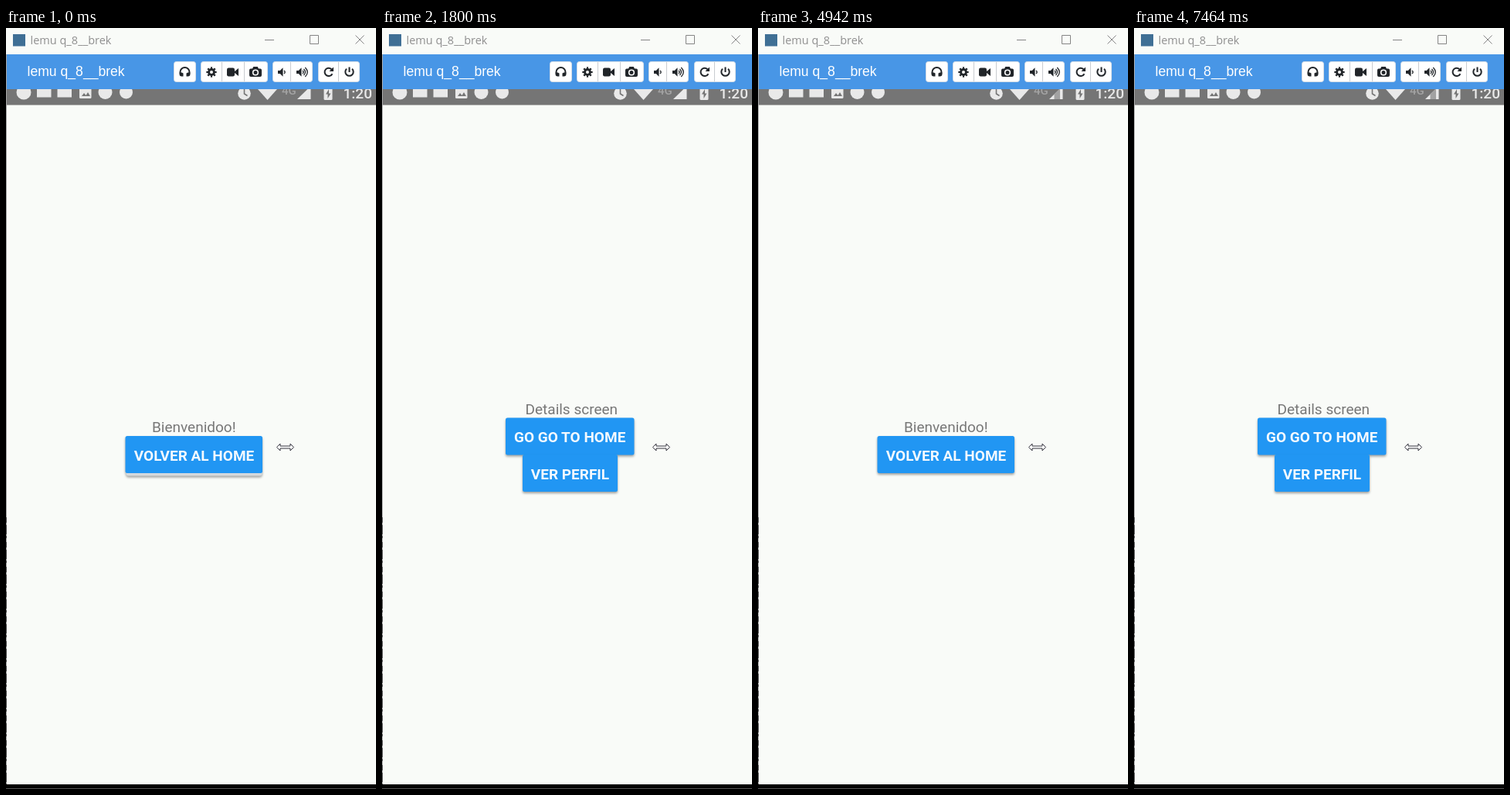
An HTML page that plays this animation: 479 by 983 pixels, repeating every 8000 ms.

```html
<!DOCTYPE html>
<html lang="es">
<head>
<meta charset="utf-8">
<title>Screen mirror</title>
<style>
  html, body { margin: 0; width: 100%; height: 100%; overflow: hidden; background: #f9fbf8; }
  svg { display: block; width: 479px; height: 983px; }

  .title { font: 14.5px "Open Sans", "Noto Sans", sans-serif; fill: #8f8f8f; }
  .device { font: 17.6px "Liberation Sans", Arial, sans-serif; fill: #fff; }
  .window { fill: none; stroke: #858585; }
  .group { fill: #fff; stroke: #d3dce6; }
  .divider { stroke: #c9ccd0; }
  .icon { fill: #212529; }
  .line { fill: none; stroke: #212529; stroke-width: 2; }

  .status { fill: #e9e9e9; filter: blur(.45px); }
  .status text { font: 500 19px Roboto, sans-serif; }
  .status .net { font-size: 15px; fill: #a3a3a3; }
  .cut { fill: none; stroke: #757575; stroke-width: 1.6; }

  .screen { font: 19px Roboto, sans-serif; text-anchor: middle; visibility: hidden; }
  .label { fill: #777; filter: blur(.35px); }
  .button rect { fill: #2196f3; }
  .button { filter: drop-shadow(0 2px 1.6px rgba(0, 0, 0, .36)); }
  .button text { font-weight: 700; fill: #f4f9fe; filter: blur(.3px); }

  .screen, #weak, #lift { animation: 8s step-end infinite; }
  #welcome { animation-name: welcome; }
  #home { animation-name: home; }
  #details { animation-name: details; }
  #weak { visibility: hidden; animation-name: weak; }
  #lift { visibility: hidden; animation-name: lift; }

  @keyframes welcome {
    0%, 42.125% { visibility: visible; }
    1.5%, 74.875%, 100% { visibility: hidden; }
  }
  @keyframes home {
    0%, 22.5%, 83.25%, 100% { visibility: hidden; }
    1.5%, 74.875% { visibility: visible; }
  }
  @keyframes details {
    0%, 42.125% { visibility: hidden; }
    22.5%, 83.25%, 100% { visibility: visible; }
  }
  @keyframes weak {
    0% { visibility: hidden; }
    34.875%, 100% { visibility: visible; }
  }
  @keyframes lift {
    0% { visibility: visible; }
    1.5%, 100% { visibility: hidden; }
  }
</style>
</head>
<body>
<svg viewBox="0 0 479 983">
  <rect width="479" height="983" fill="#f9fbf8"/>

  <!-- Phone status bar, partly under the toolbar -->
  <rect x="1" y="78" width="478" height="21.5" fill="#757575"/>
  <g class="status">
    <circle cx="23" cy="83" r="9.5"/>
    <rect x="40" y="74" width="18.5" height="15.5"/>
    <rect x="66.500" y="74" width="18.500" height="15.500"/>
    <rect x="95" y="76" width="15.500" height="15" rx="1.500"/>
    <path class="cut" d="M98 88l3-4 2.500 3 2.500-4 3 5z" style="fill:#757575;stroke:none"/>
    <circle cx="128.500" cy="83" r="9"/>
    <circle cx="155.500" cy="83" r="8.500"/>
    <circle cx="308.500" cy="84.500" r="8.300"/>
    <path class="cut" d="M308.500 79v6l4 2.500"/>
    <path d="M326 79q12.500-7 25 0L338.500 93z"/>
    <text class="net" x="357" y="86">4G</text>
    <path d="M377 92L394.500 75v17z"/>
    <path id="weak" d="M383.500 92v-6.300L391 78.400V92z" fill="#a2a2a2"/>
    <rect x="411.500" y="76" width="11" height="17" rx="1.500"/>
    <path d="M418 79l-4 6.500h2.500V91l4-6.500h-2.500z" fill="#757575"/>
    <text x="436.500" y="91">1:20</text>
  </g>

  <!-- Window title -->
  <rect x="9" y="8" width="16" height="15.500" fill="#3f6f95"/>
  <text class="title" x="31.500" y="21">lemu q_8__brek</text>
  <path class="window" d="M335 15.500h12M393.500 9.500h11v11h-11zM452.500 9.500l11 11m0-11l-11 11"/>

  <!-- Toolbar -->
  <rect x="1" y="34" width="478" height="45" fill="#4896e6"/>
  <text class="device" x="27.500" y="62">lemu q_8__brek</text>
  <g class="group">
    <rect x="217.500" y="43.500" width="28" height="26" rx="3"/>
    <rect x="252.500" y="43.500" width="86" height="26" rx="3"/>
    <rect x="345.500" y="43.500" width="51" height="26" rx="3"/>
    <rect x="404.500" y="43.500" width="53" height="26" rx="3"/>
  </g>
  <path class="divider" d="M279.500 44v25M308.500 44v25M368.500 44v25M430.500 44v25"/>

  <path class="line" stroke-width="1.800" d="M225.500 59v-2a6 6 0 0 1 12 0v2"/>
  <path class="icon" d="M225 57.500h2.500l2 1v4h-2q-3 0-3-3zM238 57.500h-2.500l-2 1v4h2q3 0 3-3z"/>

  <circle class="line" cx="266" cy="57" r="3.500" style="stroke-width:3"/>
  <circle class="line" cx="266" cy="57" r="5.500" style="stroke-width:2.400" pathLength="16" stroke-dasharray="1 1" stroke-dashoffset=".5"/>

  <rect class="icon" x="286" y="51.500" width="10" height="11" rx="2.200"/>
  <path class="icon" d="M296 56l5-4v10l-5-4z"/>

  <path class="icon" d="M317 52.500h2l1.300-2.500h5.400l1.300 2.500h2q2 0 2 2v6.500q0 2-2 2h-12q-2 0-2-2v-6.500q0-2 2-2z"/>
  <circle cx="323" cy="57.500" r="3.300" fill="none" stroke="#fff" stroke-width="1.600"/>

  <g id="speaker">
    <path class="icon" d="M352 55h2.800l3.700-3.700v11.400L354.800 59H352z"/>
    <path class="line" d="M360 55q2.300 2 0 4" style="stroke-width:1.400"/>
  </g>
  <use href="#speaker" x="24"/>
  <path class="line" d="M385.500 53q4 4 0 8M387.300 51q6 6 0 12" style="stroke-width:1.300"/>

  <path class="line" d="M421.800 53.600a5.200 5.200 0 1 0 .6 5.600"/>
  <path class="icon" d="M424 50.500v5.500h-5.500z"/>

  <path class="line" d="M441 52.800a5.200 5.200 0 1 0 7 0M444.500 50.500v6.500"/>

  <!-- Phone screens -->
  <g class="screen" id="welcome">
    <text class="label" x="243.300" y="522">Bienvenidoo!</text>
    <g class="button">
      <rect id="lift" x="155.500" y="530" width="176" height="48.500" rx="3" style="fill:#d5d9dc"/>
      <rect x="154.500" y="527" width="177.500" height="48" rx="2.500"/>
      <text x="243.500" y="558.500">VOLVER AL HOME</text>
    </g>
  </g>

  <g class="screen" id="home">
    <text class="label" x="243" y="522">Hola mundoo!</text>
    <g class="button">
      <rect x="150" y="527" width="186" height="48" rx="2.500"/>
      <text x="243" y="558.500">GO GO TO DETAILS</text>
    </g>
  </g>

  <g class="screen" id="details">
    <text class="label" x="245.300" y="498.500">Details screen</text>
    <g class="button">
      <rect x="160" y="503.500" width="166.500" height="48" rx="2.500"/>
      <text x="243.200" y="535">GO GO TO HOME</text>
    </g>
    <g class="button">
      <rect x="182" y="551" width="123" height="48" rx="2.500"/>
      <text x="243.500" y="582.500">VER PERFIL</text>
    </g>
  </g>

  <!-- Resize cursor -->
  <path d="M350.500 541.500l4.500-4.500v3h13v-3l4.500 4.500-4.500 4.500v-3h-13v3z" fill="#fff" stroke="#33333d"/>

  <!-- Window edges -->
  <path d="M.5 34V977" stroke="#a5a5a5"/>
  <path d="M.5 632V977" stroke="#4a4a4a" stroke-dasharray="7 3 12 2 3 5"/>
  <rect y="977" width="479" height="5" fill="#000"/>
  <rect y="982" width="479" height="1" fill="#555"/>
</svg>
</body>
</html>
```
